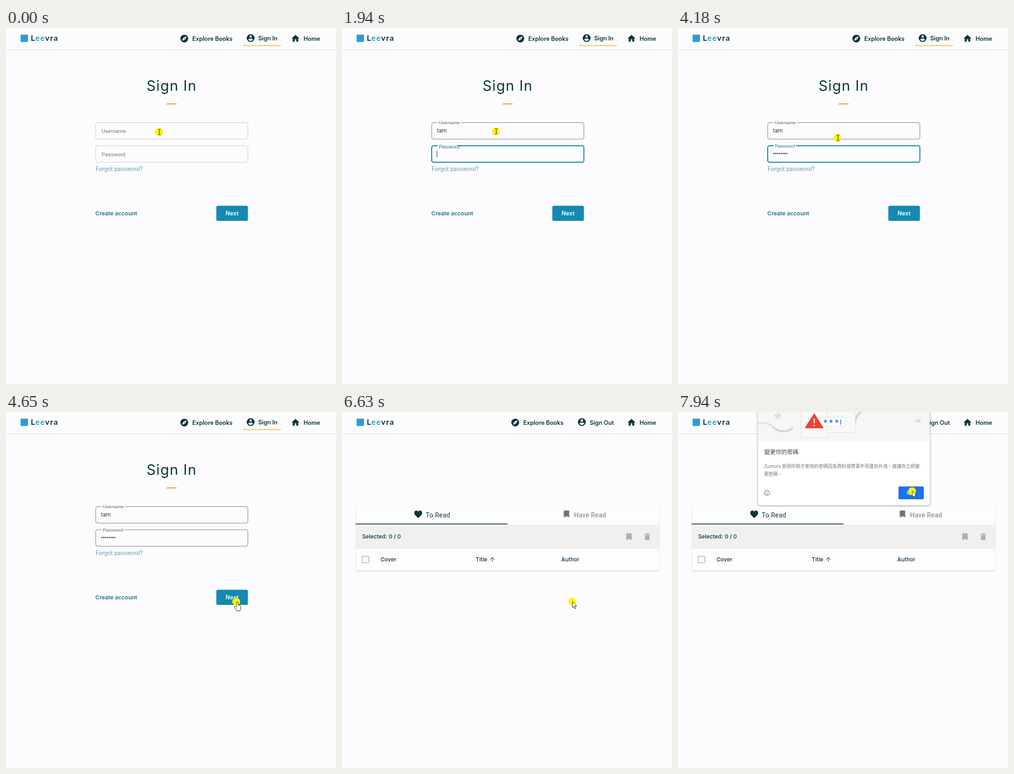
These frames come from a looping animation (721x777 px, 7.99 s). An HTML page:

```html
<!DOCTYPE html>
<html lang="en">
<head>
<meta charset="utf-8">
<title>Sign in</title>
<style>
  html, body { margin: 0; width: 100%; height: 100%; overflow: hidden; background: #fcfcfe; }
  svg { display: block; width: 721px; height: 777px; }
  text { font: 500 12.2px Inter, sans-serif; fill: #0b3542; white-space: pre; }
  .nav text { font-size: 12.8px; font-weight: 600; }
  .dark { fill: #0b3542; }
  .nav .brand { font: 700 17.5px Lato, sans-serif; letter-spacing: 1.5px; }
  .brand tspan { fill: #2f9fc8; }
  .title { font-size: 31px; font-weight: 400; letter-spacing: 1.4px; text-anchor: middle; }
  .link { fill: #25748f; font-size: 12.4px; font-weight: 600; }
  .light { fill: #3b7f98; font-size: 12.4px; font-weight: 300; }
  .btn { fill: #fff; font-size: 12.5px; font-weight: 600; text-anchor: middle; }
  .field .box { fill: none; stroke: #c8c8ca; }
  .field.filled .box { stroke: #777; }
  .field.focus .box { stroke: #147d99; stroke-width: 2; }
  .field text { font: 400 11.7px Roboto, sans-serif; fill: #757575; }
  .field.filled .label { fill: #666; }
  .field.focus .label { fill: #25748f; }
  .field .value { font-size: 12px; fill: #333; }
  .dots { stroke: #333; stroke-width: 2.8; stroke-linecap: round; stroke-dasharray: 0 4; }
  .caret { stroke: #222; }
  .tab { font: 400 14px Roboto, sans-serif; letter-spacing: .4px; }
  .mute { fill: #757575; }
  .pale { fill: #b0b0b4; }
  #dialog text { font: 400 10px "Noto Sans CJK TC", "Noto Sans CJK", "Noto Sans TC", sans-serif; fill: #757575; }
  #dialog .head { font-size: 12.4px; fill: #444; }
  #dialog .ok { fill: #fff; text-anchor: middle; }
  #dialog .mask { font: 700 17px "Noto Sans Mono", monospace; letter-spacing: 2.2px; fill: #3a70d4; }
  #dialog .star { font: 700 34px "Noto Sans Mono", monospace; fill: #dadada; }
  #pop { filter: drop-shadow(0 1px 2px rgba(40, 40, 70, .5)); }
  #card { filter: drop-shadow(0 1px 1px rgba(40, 40, 70, .25)); }
</style>
</head>
<body>
<svg viewBox="0 0 721 777">
  <defs>
    <g id="compass"><circle r="8.6" class="dark"/><path d="M-5 5 -2-2 5-5 2 2Z" fill="#fff"/><circle r="1" class="dark"/></g>
    <g id="person"><circle r="8.6" class="dark"/><circle cy="-3.4" r="2.6" fill="#fff"/><path d="M-5.2 3.4C-5 .2 5 .2 5.2 3.4Q0 9 -5.2 3.4Z" fill="#fff"/></g>
    <path id="mark" d="M0 1.5Q0 0 1.5 0H10.5Q12 0 12 1.5V15L6 12.4 0 15Z"/>
  </defs>

  <g class="nav">
    <path d="M0 47.5H721" stroke="#d3d3d3"/>
    <rect x="32" y="14.5" width="16" height="16" fill="#2f9fc8"/>
    <text class="brand" x="54" y="28">L<tspan>ee</tspan>vra</text>
    <path class="dark" d="M632.5 15 641 22.8H638.5V30H634.2V24.8H630.8V30H626.5V22.8H624Z"/>
    <text x="650" y="28">Home</text>
    <g id="explore"><use href="#compass" x="389.5" y="23"/><text x="407" y="28">Explore Books</text></g>
  </g>

  <g id="signin">
    <g class="nav">
      <use href="#person" x="534.5" y="22"/>
      <text x="551" y="27">Sign In</text>
      <rect x="518" y="37" width="83" height="2.5" fill="#fbd165"/>
    </g>
    <text class="title" x="362" y="136.5">Sign In</text>
    <rect x="351" y="164.5" width="22" height="2.5" fill="#eab040"/>
    <g class="field" id="user">
      <rect class="box" x="196" y="206.5" width="332.5" height="36" rx="4"/>
      <rect class="notch" x="209" y="204" height="5" fill="#fcfcfe"/>
      <text class="label">Username</text>
      <text class="value" x="207.5" y="228"></text>
      <path class="caret" d="M.5 218V231"/>
    </g>
    <g class="field" id="pass">
      <rect class="box" x="196" y="257" width="332.5" height="36" rx="4"/>
      <rect class="notch" x="209" y="254.5" height="5" fill="#fcfcfe"/>
      <text class="label">Password</text>
      <line class="dots" x1="209.5" y1="274" y2="274"/>
      <path class="caret" d="M.5 268V282"/>
    </g>
    <text class="light" x="196" y="312">Forgot password?</text>
    <text class="link" x="195" y="409">Create account</text>
    <rect id="next" x="459.5" y="388" width="69" height="33" rx="3.5"/>
    <text class="btn" x="494" y="409">Next</text>
    <rect id="toast" x="0" width="94" height="40" rx="1" fill="#77bb78"/>
  </g>

  <g id="shelf">
    <g class="nav">
      <use href="#person" x="524" y="22"/>
      <text x="594" y="28" text-anchor="end">Sign Out</text>
    </g>
    <rect id="card" x="30.5" y="207" width="662.5" height="139" rx="3" fill="#fdfdfe"/>
    <path class="dark" d="M166.500 231.500C161 226.500 158 224 158 220 158 214.500 164 213.500 166.500 217.500 169 213.500 175 214.500 175 220 175 224 172 226.500 166.500 231.500Z"/>
    <text class="tab" x="183" y="230">To Read</text>
    <use href="#mark" class="mute" x="484.5" y="215"/>
    <text class="tab mute" x="507" y="230">Have Read</text>
    <rect x="30" y="246" width="663" height="51" fill="#f0f0ef"/>
    <rect x="30" y="243.5" width="332" height="1.8" class="dark"/>
    <path d="M30 297.5H693" stroke="#e6e6e8"/>
    <text x="44" y="276">Selected: 0 / 0</text>
    <use href="#mark" class="pale" x="621" y="264.5"/>
    <path class="pale" d="M661 265.5H664.5L665.5 264.5H668.5L669.5 265.5H673V267.2H661ZM662 268.5H672V278Q672 279.5 670.5 279.5H663.5Q662 279.5 662 278Z"/>
    <rect x="44.5" y="315" width="14" height="14" rx="1" fill="none" stroke="#b3b3c0" stroke-width="1.6"/>
    <text x="84" y="326">Cover</text>
    <text x="292" y="326">Title</text>
    <path d="M328.5 327.5V317.5M323.5 322.5 328.5 317.5 333.5 322.5" fill="none" stroke="#666" stroke-width="1.4"/>
    <text x="479" y="326">Author</text>
  </g>

  <g id="dialog">
    <rect id="pop" x="175.5" y="-40" width="373.5" height="246" rx="5" fill="#fff"/>
    <rect x="176" y="-40" width="372.5" height="107" fill="#f6f6f4"/>
    <g fill="none" stroke="#d2d0d2" stroke-width="4">
      <path d="M176 28C192 22 202 30 209 36" stroke="#e3e2e2"/>
      <path d="M209 36C222 48 242 47 252 37"/>
      <path d="M387 27C387 12 397 1 411 -2"/>
    </g>
    <text class="star" x="209" y="30">*</text>
    <g fill="#f8f8f7" stroke="#e2e2e0">
      <rect x="326" y="-10" width="61" height="57" rx="3"/>
      <rect x="269.5" y="-10" width="56" height="69" rx="4"/>
    </g>
    <rect x="310" y="14" width="55" height="20" rx="2" fill="#fff" stroke="#d3deee"/>
    <text class="mask" x="317" y="33">***</text>
    <path d="M355.5 19V30" stroke="#3a70d4" stroke-width="1.8"/>
    <path d="M298 7 317 37H279Z" fill="#e94335" stroke="#e94335" stroke-width="2" stroke-linejoin="round"/>
    <path d="M298 17V27M298 30.5V33" stroke="#fff" stroke-width="2.6"/>
    <path d="M517 25Q517 20 521 20 523 16 527 19 530 20 530 25Z" fill="#dededf"/>
    <text class="head" x="189.5" y="94.5">變更你的密碼</text>
    <text x="189" y="125">Zumora 發現你剛才使用的密碼因為資料侵害事件而遭到外洩。建議你立即變</text>
    <text x="189" y="141.5">更密碼。</text>
    <circle cx="195.5" cy="179" r="5.3" fill="none" stroke="#666" stroke-width="1.2"/>
    <path d="M195.5 176V177.3M195.5 178.3V182" stroke="#666" stroke-width="1.3"/>
    <rect x="481" y="165" width="55" height="28" rx="3" fill="#1a73e8"/>
    <text class="ok" x="508.5" y="183">確定</text>
  </g>

  <g id="cursor">
    <circle r="8.5" fill="#fff500"/>
    <path id="beam" d="M-2-6H.3M1.7-6H4M1-5.5V5.5M-2 6H.3M1.7 6H4" fill="none" stroke="#222" stroke-width="1.2"/>
    <path id="arrow" d="M.5-.5V13L3.6 10.2 5.8 15.2 7.8 14.3 5.7 9.5H9.8Z" fill="#fff" stroke="#222"/>
    <path id="hand" d="M1 12V1.6A1.6 1.6 0 0 1 4.2 1.6V7.5L8.6 8.5Q10 8.9 10 10.5V14.5Q10 16.5 8.5 18.5V20H.7V18.5L-4 12.5Q-4.8 10.9 -3.4 10.5T1 12Z" fill="#fff" stroke="#222"/>
  </g>
</svg>
<script>
const LOOP = 7990;
const NAME = "tarn";
const userKeys = [1100, 1310, 1520, 1560];
const passKeys = [2320, 2490, 2620, 2790, 3130, 3210, 3380, 3550];
const T = { focus: 210, tab: 1860, blur: 4600, submit: 4940, toast: 6225, shelf: 6600, dialog: 6800, close: 7820 };

const $ = id => document.getElementById(id);
const lerp = (a, b, p) => a + (b - a) * p;
const span = (t, a, b) => Math.min(1, Math.max(0, (t - a) / (b - a)));
const out = p => 1 - (1 - p) ** 3;
const inOut = p => p * p * (3 - 2 * p);
const show = (el, on) => el.setAttribute("display", on ? "inline" : "none");
const typed = (keys, t) => keys.filter(k => k <= t).length;

// start, end, x, y
const path = [
  [130, 210, 336, 225.5],
  [4100, 4580, 503, 414],
  [7060, 7800, 511.5, 173]
];

function pointer(t) {
  let x = 334, y = 227;
  for (const [a, b, px, py] of path) {
    const p = inOut(span(t, a, b));
    x = lerp(x, px, p);
    y = lerp(y, py, p);
  }
  return [x, y];
}

function parts(id) {
  const root = $(id), pick = c => root.querySelector("." + c);
  return { root, label: pick("label"), notch: pick("notch"), caret: pick("caret"), value: pick("value"), dots: pick("dots") };
}
const user = parts("user"), pass = parts("pass");

function field(f, t, start, end, keys, top, notch) {
  const focused = t >= start && t < end;
  const p = out(span(t, start, start + 160));
  f.root.classList.toggle("focus", focused || t >= T.submit + 60);
  f.root.classList.toggle("filled", t >= end);
  f.label.setAttribute("transform",
    `translate(${lerp(209, 212, p)} ${lerp(top + 22.5, top + 3.5, p)}) scale(${lerp(1, .85, p)})`);
  f.notch.setAttribute("width", notch * p);
  const n = typed(keys, t);
  const since = t - (n ? keys[n - 1] : start);
  show(f.caret, focused && since % 1060 < 530);
  return n;
}

function draw(t) {
  const shelf = t >= T.shelf;
  show($("signin"), !shelf);
  show($("shelf"), shelf);
  $("explore").setAttribute("transform", `translate(${shelf ? -11 : 0})`);

  if (!shelf) {
    const n = field(user, t, T.focus, T.tab, userKeys, 206.5, 51);
    user.value.textContent = NAME.slice(0, n);
    const w = n ? user.value.getComputedTextLength() : 0;
    user.caret.setAttribute("transform", `translate(${Math.round(207.5 + w)})`);

    const m = field(pass, t, T.tab, T.blur, passKeys, 257, 49);
    show(pass.dots, m);
    pass.dots.setAttribute("x2", 209.6 + 4 * (m - 1));
    pass.caret.setAttribute("transform", `translate(${207 + 4 * m})`);

    const p = span(t, T.submit, 5150);
    const rgb = [[19, 47], [138, 175], [178, 219]].map(([a, b]) => Math.round(lerp(a, b, p)));
    $("next").setAttribute("fill", `rgb(${rgb})`);
    $("toast").setAttribute("y", 777 - 40 * out(span(t, T.toast, T.toast + 150)));
  }

  const open = out(span(t, T.dialog, 6960));
  const shut = span(t, T.close, 7940);
  show($("dialog"), t >= T.dialog);
  $("dialog").setAttribute("opacity", open);
  $("dialog").setAttribute("transform",
    `translate(362 ${lerp(-20, 0, open) - 2.6 * shut}) scale(${1 + .006 * shut} 1) translate(-362 0)`);

  const [x, y] = pointer(t);
  const inX = x > 196 && x < 528;
  const beam = !shelf && inX && (y > 206 && y < 243 || y > 257 && y < 293);
  const hand = !shelf && x > 459 && y > 388;
  show($("beam"), beam);
  show($("hand"), hand);
  show($("arrow"), !beam && !hand);
  $("cursor").setAttribute("transform", `translate(${x} ${y})`);
}

const begin = performance.now();
function tick() {
  draw((performance.now() - begin) % LOOP);
  requestAnimationFrame(tick);
}
tick();
</script>
</body>
</html>
```
